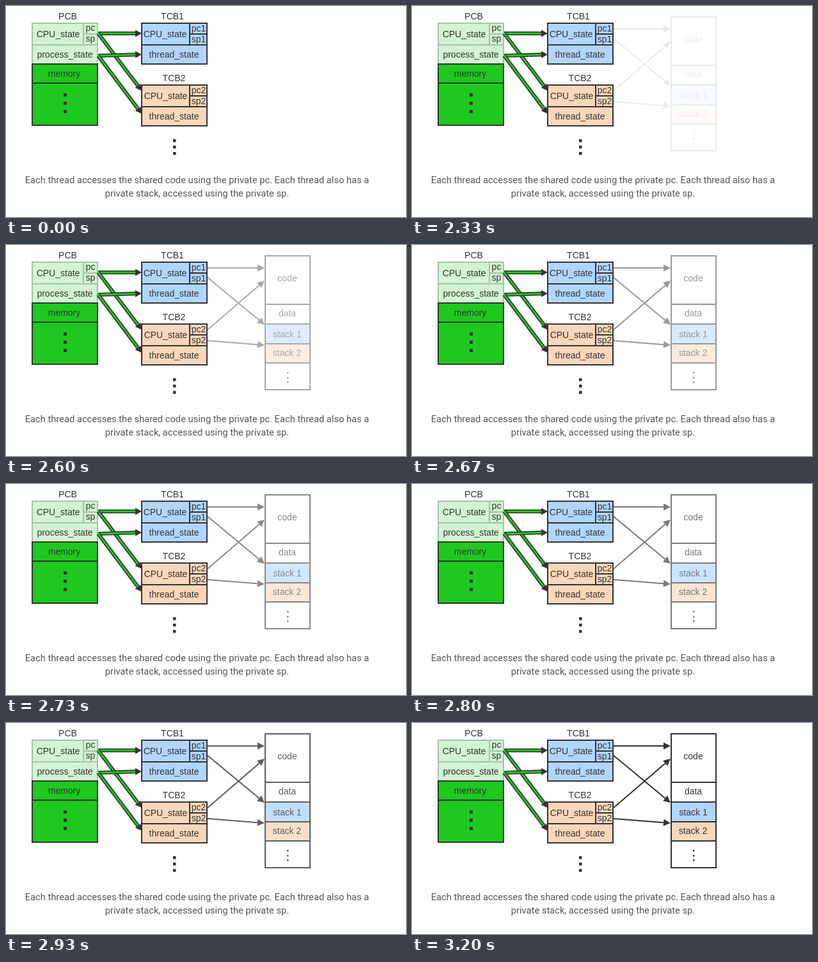
An HTML page that plays this animation: 625x331 px, repeating every 4990 ms.

```html
<!DOCTYPE html>
<html lang="en">
<head>
<meta charset="utf-8">
<style>
html, body { margin: 0; width: 100%; height: 100%; overflow: hidden; background: #fff; }
svg { display: block; width: 625px; height: 331px; }
text { font: 14px "Liberation Sans", Arial, sans-serif; fill: #333; text-anchor: middle; }
.caption { font: 14.7px Roboto, sans-serif; fill: #555; }
</style>
</head>
<body>
<svg id="stage" viewBox="0 0 625 331"></svg>
<script>
const DARK = "#333", GREEN = "#1ec81e", PALE = "#d2f4d2", PALE_LINE = "#a6c3a6";
const BLUE = "#b0d6ff", ORANGE = "#f8d7bb";
const LOOP = 4990, FADE_START = 2330, STEP = 66.9, STEPS = 14;

const box = (x1, y1, x2, y2, fill, stroke = DARK) =>
  `<rect x="${x1}" y="${y1}" width="${x2 - x1}" height="${y2 - y1}" fill="${fill}" stroke="${stroke}" stroke-width="2"/>`;
const label = (x, y, text, cls = "") => `<text x="${x}" y="${y}" class="${cls}">${text}</text>`;
const dots = (x, ys, size) =>
  ys.map(y => `<rect x="${x}" y="${y}" width="${size}" height="${size}" fill="${DARK}"/>`).join("");
const line = (x1, y1, x2, y2, color, width) =>
  `<path d="M${x1} ${y1}L${x2} ${y2}" stroke="${color}" stroke-width="${width}"/>`;

// Shaft with a triangular head whose tip is at (x2, y2).
function arrow(x1, y1, x2, y2, width, head, core) {
  const angle = Math.atan2(y2 - y1, x2 - x1);
  const bx = x2 - head * Math.cos(angle), by = y2 - head * Math.sin(angle);
  return line(x1, y1, bx, by, DARK, width)
    + (core ? line(x1, y1, bx, by, GREEN, core) : "")
    + `<path d="M0 0L${-head} -5.5V5.5Z" fill="${DARK}" transform="translate(${x2} ${y2}) rotate(${angle * 180 / Math.PI})"/>`;
}

function threadBlock(n, y, fill) {
  return label(260 + (n - 1) * 2.5, y - 6, "TCB" + n)
    + box(212, y, 314, y + 64, fill)
    + line(212, y + 34, 314, y + 34, DARK, 2)
    + line(287, y, 287, y + 34, DARK, 2)
    + line(287, y + 17, 314, y + 17, DARK, 2)
    + label(248.5 + (n - 1), y + 22, "CPU_state")
    + label(301, y + 13, "pc" + n)
    + label(301, y + 30, "sp" + n)
    + label(262.5, y + 54, "thread_state");
}

const processBlock = label(96.5, 21, "PCB")
  + box(41, 27, 143, 91, PALE, PALE_LINE)
  + line(41, 61, 143, 61, PALE_LINE, 2)
  + line(121, 27, 121, 61, PALE_LINE, 2)
  + line(121, 44, 143, 44, PALE_LINE, 2)
  + label(81.5, 49, "CPU_state") + label(132, 39, "pc") + label(132, 56, "sp")
  + label(92, 81, "process_state")
  + box(41, 91, 143, 187, GREEN)
  + line(41, 121, 143, 121, DARK, 2)
  + label(91, 111, "memory")
  + dots(90, [137, 150, 163], 5);

const links = [[43, 43], [43, 133], [78, 76], [78, 169]]
  .map(([from, to]) => arrow(144, from, 212, to, 6, 10, 2.8)).join("");

const memoryBlock = box(405, 17, 475, 93, "#fff") + box(405, 93, 475, 124, "#fff")
  + box(405, 124, 475, 155, BLUE) + box(405, 155, 475, 185, ORANGE)
  + box(405, 185, 475, 227, "#fff")
  + label(439.5, 57, "code") + label(439.5, 112, "data")
  + label(439.5, 145, "stack 1") + label(439, 174, "stack 2")
  + dots(439, [199, 207, 214], 2.5)
  + [[36, 36], [51, 125], [133, 56], [150, 157]]
    .map(([from, to]) => arrow(315, from, 404, to, 2, 11)).join("");

const stage = document.getElementById("stage");
stage.innerHTML = processBlock + threadBlock(1, 27, BLUE) + threadBlock(2, 124, ORANGE)
  + links + dots(261, [209, 219, 229], 4.5)
  + `<g id="memory" opacity="0">${memoryBlock}</g>`
  + label(298.5, 278, "Each thread accesses the shared code using the private pc. Each thread also has a", "caption")
  + label(298.5, 299, "private stack, accessed using the private sp.", "caption");

const memory = document.getElementById("memory");
const startTime = performance.now();

function draw(now) {
  const t = Math.max(0, now - startTime) % LOOP;
  const step = Math.floor((t - FADE_START + 4) / STEP) + 1;
  const progress = Math.min(1, Math.max(0, step / STEPS));
  memory.setAttribute("opacity", 1 - (1 - progress) ** 1.25);
  requestAnimationFrame(draw);
}
draw(startTime);
</script>
</body>
</html>
```
